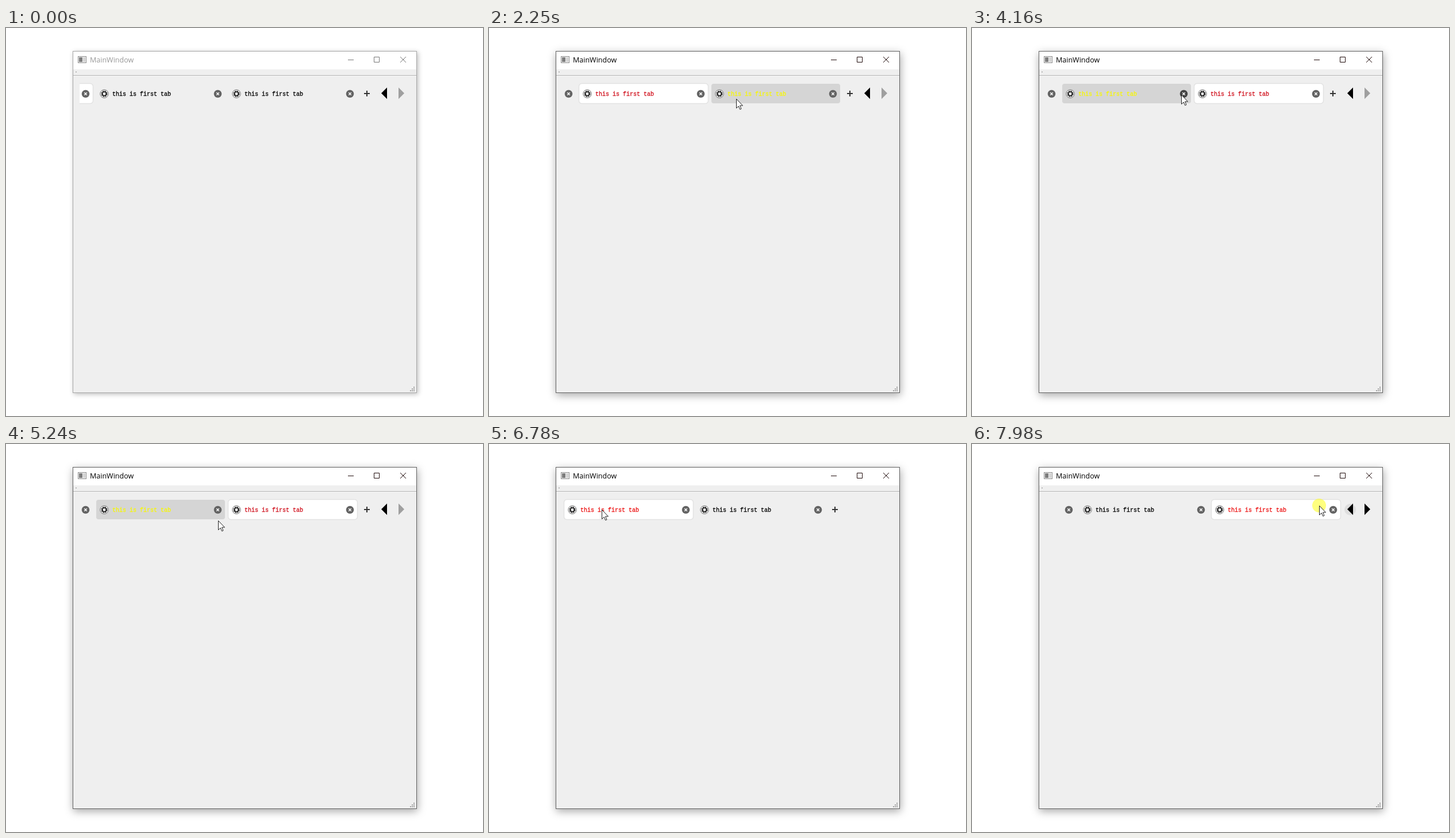
An HTML page for the animation above (8000 ms loop, 830x675 px).

```html
<!DOCTYPE html>
<html lang="en">
<head>
<meta charset="utf-8">
<title>MainWindow</title>
<style>
  html, body { margin: 0; width: 100%; height: 100%; overflow: hidden; background: #fff; }
  svg { position: absolute; left: 0; top: 0; }
  #frame {
    position: absolute; left: 116px; top: 40px; width: 597px; height: 593px;
    border: 1px solid #a6a6a6; background: #efefef;
    box-shadow: 2px 2px 8px rgba(0, 0, 0, .27);
  }
  #frame.active { border-color: #606060; box-shadow: 1px 4px 14px rgba(0, 0, 0, .35); }
  #title { font: 12.5px "Open Sans", "Noto Sans", sans-serif; }
  .label { font: 10px "Liberation Mono", monospace; stroke-width: .3px; }
</style>
</head>
<body>
<div id="frame"></div>
<svg width="830" height="675" viewBox="0 0 830 675">
  <defs>
    <clipPath id="strip"><rect x="128" y="90" width="518" height="50"/></clipPath>
    <g id="gear" fill="none">
      <circle r="7.2" fill="#ededed" stroke="#777"/>
      <circle r="3.2" fill="#fff" stroke="#222" stroke-width="1.6"/>
      <circle r="4.6" stroke="#222" stroke-width="1.8" stroke-dasharray="2.3 1.31"/>
    </g>
    <path id="cross" d="M-2.2-2.2 2.2 2.2M2.2-2.2-2.2 2.2" stroke="#fff" stroke-width="1.4"/>
  </defs>

  <rect x="117" y="41" width="597" height="31" fill="#fff"/>
  <path d="M117 82.5H714" stroke="#b2b2b2"/>
  <path d="M117 83.5H714" stroke="#f9f9f9"/>
  <rect x="121" y="76" width="2" height="1" fill="#888"/>

  <rect x="125.5" y="49.5" width="14" height="11" fill="#f2f2f2" stroke="#8c8c8c"/>
  <rect x="127" y="51" width="6" height="8" fill="#7d7d7d"/>
  <rect x="134" y="51" width="4" height="8" fill="#d2d2d2"/>
  <text id="title" x="146" y="60">MainWindow</text>
  <path id="buttons" fill="none" d="M595 55.5h10M640.5 50.5h9v9h-9zM686 50l10 10m0-10l-10 10"/>

  <g id="grip" fill="#a0a0a0"></g>
  <g id="tabs" clip-path="url(#strip)"></g>

  <circle id="plusHover" cy="114" r="10" fill="#dedede"/>
  <path id="plus" d="M-5 0H5M0-5V5" stroke="#333" stroke-width="2"/>
  <g id="arrows">
    <path d="M653 113.5l10-10v20z"/>
    <path id="next" d="M693 113.5l-10-10v20z"/>
  </g>

  <circle id="press" r="12" fill="#ff0" fill-opacity=".5"/>
  <path id="cursor" d="M.5.5V16.500L4.200 13 6.700 18.600 9 17.600 6.600 12H11.500Z"
        fill="#fff" stroke="#222" stroke-linejoin="round"/>
</svg>
<script>
const LOOP = 8000, TAB_WIDTH = 224, PITCH = 229.8, PRESS_TIME = 120;
const $ = id => document.getElementById(id);
const show = (el, on) => el.style.display = on ? '' : 'none';
const place = (el, x, y) => el.setAttribute('transform', `translate(${x} ${y})`);
const smooth = k => k * k * (3 - 2 * k);

// Pointer gestures; sag bends the way downwards
const entry = { x: 736, y: 668 };
const moves = [
  { from: 440, to: 1160, x: 246, y: 157 },
  { from: 1250, to: 1500, x: 244, y: 114 },
  { from: 1920, to: 2250, x: 430, y: 123 },
  { from: 2440, to: 2670, x: 352, y: 127 },
  { from: 2730, to: 3010, x: 369, y: 112, sag: 12 },
  { from: 3600, to: 4160, x: 364, y: 116, sag: 27 },
  { from: 4719, to: 4720, x: 366, y: 116 },
  { from: 5000, to: 5540, x: 372, y: 114, sag: 18 },
  { from: 6060, to: 6300, x: 335, y: 129 },
  { from: 6480, to: 6780, x: 196, y: 114 },
  { from: 6930, to: 7710, x: 604, y: 107, sag: 21 }
];

// Tab bar after each click
const initial = { left: -72.6, count: 3, selected: 0 };
const clicks = [
  { at: 1640, left: -72.6, count: 3, selected: 1 },
  { at: 2330, left: -72.6, count: 3, selected: 2 },
  { at: 5840, left: 131, count: 2, selected: 1 },
  { at: 6240, left: 131, count: 2, selected: 0 },
  { at: 7880, left: -43, count: 3, selected: 2 }
];
const [focusClick, , closeClick, switchClick, addClick] = clicks;

const tabs = [0, 1, 2].map(() => {
  const g = document.createElementNS('http://www.w3.org/2000/svg', 'g');
  g.innerHTML = `
    <rect class="selected" x="-.5" y="96.5" width="225" height="35" rx="5" fill="#fff" stroke="#e2e2e2" stroke-width="1.5"/>
    <rect class="hover" y="97" width="${TAB_WIDTH}" height="34" rx="4" fill="#d5d5d5"/>
    <use href="#gear" x="14" y="114.5"/>
    <text class="label" x="28" y="118">this is first tab</text>
    <circle class="close" cx="211.5" cy="114.5" r="6.8"/>
    <use href="#cross" x="211.5" y="114.5"/>`;
  $('tabs').append(g);
  const part = name => g.querySelector('.' + name);
  return { g, selected: part('selected'), hover: part('hover'), label: part('label'), close: part('close') };
});

for (let row = 0; row < 3; row++)
  for (let col = 0; col <= row; col++)
    $('grip').innerHTML += `<rect x="${709 - col * 3}" y="${624 + row * 3}" width="2" height="2"/>`;

function pointerAt(t) {
  const i = moves.findLastIndex(m => m.from <= t);
  if (i < 0) return { x: -100, y: -100 };
  const a = moves[i - 1] ?? entry, b = moves[i];
  const k = smooth(Math.min(1, (t - b.from) / (b.to - b.from)));
  const dip = (b.sag ?? 0) * Math.sin(Math.PI * k);
  return { x: Math.round(a.x + (b.x - a.x) * k), y: Math.round(a.y + (b.y - a.y) * k + dip) };
}

function drawTab(tab, i, bar, accent, pointer) {
  const x = Math.round(bar.left + i * PITCH), dx = pointer.x - x;
  const isSelected = i === bar.selected;
  const isHover = !isSelected && dx >= 0 && dx <= TAB_WIDTH && pointer.y >= 97 && pointer.y < 134;
  const onClose = Math.hypot(dx - 211.5, pointer.y - 114.5) < 9;
  show(tab.g, i < bar.count);
  place(tab.g, x, 0);
  show(tab.selected, isSelected);
  show(tab.hover, isHover);
  tab.label.style.fill = tab.label.style.stroke = isSelected ? accent : isHover ? '#f8f800' : '#000';
  tab.close.setAttribute('fill', onClose ? '#444' : '#646464');
}

function draw(t) {
  const pointer = pointerAt(t);
  const click = clicks.findLast(c => c.at <= t);
  const bar = click ?? initial;
  const active = t >= focusClick.at, added = t >= addClick.at;
  const accent = t < closeClick.at ? '#d0101c' : t < switchClick.at ? '#a31515' : '#ec1212';

  $('frame').classList.toggle('active', active);
  $('title').setAttribute('fill', active ? '#000' : '#999');
  $('buttons').setAttribute('stroke', active ? '#200c0c' : '#777');
  tabs.forEach((tab, i) => drawTab(tab, i, bar, accent, pointer));

  const plusX = Math.round(bar.left + (bar.count - 1) * PITCH + 241);
  const onPlus = Math.hypot(pointer.x - plusX, pointer.y - 114) < 10;
  place($('plus'), plusX, 114);
  show($('plus'), !added);
  $('plusHover').setAttribute('cx', plusX);
  show($('plusHover'), added || onPlus);
  show($('arrows'), bar.count > 2);
  $('next').setAttribute('fill', added ? '#000' : '#9f9f9f');

  place($('cursor'), pointer.x, pointer.y);
  place($('press'), pointer.x, pointer.y);
  show($('press'), click && t < click.at + PRESS_TIME);
}

const start = performance.now();
function tick() {
  draw((performance.now() - start) % LOOP);
  requestAnimationFrame(tick);
}
tick();
</script>
</body>
</html>
```
